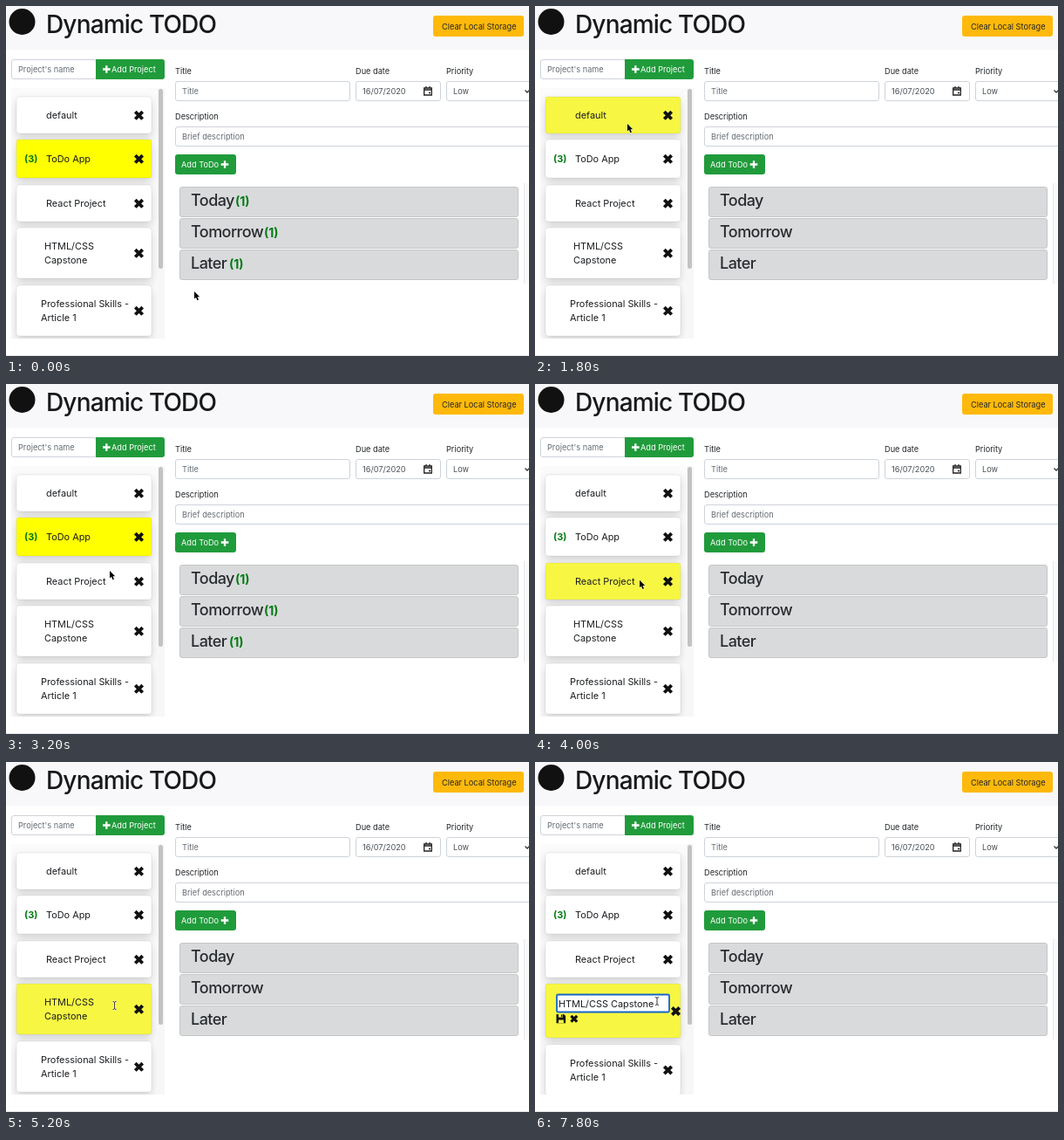
An HTML page that plays this animation: 600 by 401 pixels, repeating every 8 s.

```html
<!DOCTYPE html>
<html lang="en">
<head>
<meta charset="utf-8">
<title>Todo list</title>
<style>
  html, body { margin: 0; width: 100%; height: 100%; overflow: hidden; background: #fff; }
  svg { display: block; width: 600px; height: 401px; }
  text { font: 9.2px Inter, Roboto, sans-serif; font-optical-sizing: none; white-space: pre; fill: #212529; }
  .title { font-size: 28px; font-weight: 500; letter-spacing: -.03em; fill: #17191b; }
  .hint { fill: #656c73; }
  .value { fill: #495057; }
  .light { fill: #fff; }
  .due { font-size: 18px; font-weight: 500; letter-spacing: -.03em; fill: #282b2e; }
  .count { font-size: 14px; font-weight: 700; fill: #007b12; }
  .badge { font-size: 11px; font-weight: 700; fill: #007b12; }
  .name { font-size: 10.9px; fill: #1b1e21; }
  .card > .back { filter: drop-shadow(0 5px 5.5px rgba(0, 0, 0, .16)); }
</style>
</head>
<body>
<svg id="stage" viewBox="0 0 600 401" xmlns="http://www.w3.org/2000/svg">
  <defs><clipPath id="panel"><rect x="6" y="94" width="176" height="287"/></clipPath></defs>
</svg>
<script>
const stage = document.getElementById('stage');
const GREEN = '#209b3b', DARK = '#111', EDIT = '#f7f743';

function add(parent, tag, attrs = {}, content) {
  const el = document.createElementNS(stage.namespaceURI, tag);
  for (const key in attrs) el.setAttribute(key, attrs[key]);
  if (content) el.textContent = content;
  parent.append(el);
  return el;
}
const group = (parent, attrs) => add(parent, 'g', attrs);
const box = (parent, x, y, width, height, fill, extra) =>
  add(parent, 'rect', { x, y, width, height, fill, ...extra });
const label = (parent, x, y, str, style = '') => add(parent, 'text', { x, y, class: style }, str);
const path = (parent, d, extra) => add(parent, 'path', { d, fill: 'none', ...extra });
const line = (parent, d, stroke, width) => path(parent, d, { stroke, 'stroke-width': width });
const show = (el, on) => el.setAttribute('visibility', on ? 'visible' : 'hidden');
const cross = (parent, x, y, r = 4.2) =>
  line(parent, `M${x - r} ${y - r}l${2 * r} ${2 * r}m0 ${-2 * r}l${-2 * r} ${2 * r}`, DARK, r * .92);
const plus = (x, y, r = 4.3) =>
  line(stage, `M${x - r} ${y}h${2 * r}M${x} ${y - r}v${2 * r}`, '#fff', 2.3);

function field(x, y, w, title, value, style = 'hint') {
  box(stage, x + .5, y + .5, w - 1, 22, '#fff', { stroke: '#ced4da', rx: 2.5 });
  if (title) label(stage, x, y - 8.2, title);
  label(stage, x + 8, y + 15, value, style);
}

// Header
box(stage, 0, 0, 600, 50, '#f8f8fa');
add(stage, 'circle', { cx: 18.5, cy: 18, r: 15, fill: DARK });
label(stage, 46, 30.5, 'Dynamic TODO', 'title');
box(stage, 490, 11, 104, 24, '#ffb90b', { rx: 3 });
label(stage, 500, 26.5, 'Clear Local Storage');
box(stage, 0, 400, 600, 1, '#e4e5e6');

// New project
field(6, 61, 98, '', "Project's name");
path(stage, 'M103 61h76q3 0 3 3v17q0 3-3 3h-76z', { fill: GREEN });
plus(115.3, 72.5);
label(stage, 121, 76, 'Add Project', 'light');

// Todo form
field(194, 86, 201, 'Title', 'Title');
field(401, 86, 98, 'Due date', '16/07/2020', 'value');
field(505, 86, 110, 'Priority', 'Low', 'value');
field(194, 138, 420, 'Description', 'Brief description');
line(stage, 'M479.7 94h8.6v8h-8.6zv2h8.6M482 92v2m4 0v-2m-1 7.5h2', '#222', 1.3);
line(stage, 'M595.5 96.5l2.5 2.5l2.5-2.5', '#343a40', 1.4);
box(stage, 194, 170, 70, 23, GREEN, { rx: 3 });
label(stage, 201, 185, 'Add ToDo', 'light');
plus(251, 181.5);

// Due sections
const counts = ['Today', 'Tomorrow', 'Later'].map((name, i) => {
  const y = 207 + 36 * i;
  box(stage, 199.5, y + .5, 388, 34, '#d9dadc', { stroke: '#c4c6c8', rx: 2.5 });
  label(stage, 212, y + 22, name, 'due');
  return label(stage, [263, 296, 256][i], y + 21.5, '(1)', 'count');
});
box(stage, 594, 203, 6, 115, '#fafafa');
box(stage, 594, 203, 1, 115, '#e7e7e7');

// Project cards
const side = group(stage, { 'clip-path': 'url(#panel)' });
box(side, 6, 94, 176, 287, '#fbfbfb');
const cards = [
  [104, 42, 46, 'default'],
  [153, 44, 46, 'ToDo App'],
  [205, 42, 46, 'React Project'],
  [254, 58, 44, 'HTML/CSS', 'Capstone'],
  [320, 58, 40, 'Professional Skills -', 'Article 1']
].map(([y, h, x, ...lines]) => {
  const g = group(side, { class: 'card' });
  const back = box(g, 12, y, 155, h, '#fff',
    { class: 'back', rx: 3, stroke: 'rgba(0,0,0,.1)', 'stroke-width': .7 });
  const view = group(g);
  const mid = y + h / 2;
  lines.forEach((str, i) =>
    label(view, x, mid + 4.2 + 16.5 * (i - (lines.length - 1) / 2), str, 'name'));
  cross(view, 152.5, mid + .3);
  return { g, back, view, h };
});
label(cards[1].g, 21, 178.5, '(3)', 'badge');

// Inline editor of the fourth card
const editor = group(cards[3].g);
const input = box(editor, 25, 266.5, 129, 20, '#fff');
label(editor, 27, 280.5, 'HTML/CSS Capstone', 'name');
path(editor, 'M24.5 289h8.6l2 2v8.3h-10.6z', { fill: DARK });
line(editor, 'M27 290.7h5M27 297.2h5.8', EDIT, 3.6);
line(editor, 'M30.7 289.3v2.6', DARK, 1.5);
cross(editor, 44.8, 294.3, 3.4);
cross(editor, 161.5, 285.5);

box(side, 174, 94, 8, 287, '#f7f7f7');
box(side, 175, 95, 5, 206, '#c2c2c2', { rx: 2.5 });

// Pointers, both drawn around their own hot spot
const arrow = path(stage, 'M0 0v8.6l1.9-1.8 1.5 3.4 1.6-.7-1.5-3.2h2.7z',
  { fill: '#000', stroke: '#fff', 'stroke-width': .8, 'paint-order': 'stroke' });
const beam = group(stage);
const beamLine = 'M-2-4.5q2 0 2 1.2q0-1.2 2-1.2M0-3.5v7M-2 4.5q2 0 2-1.2q0 1.2 2 1.2';
line(beam, beamLine, '#fff', 2);
line(beam, beamLine, '#222', .9);

// Time in ticks of 200 ms, then the pointer's x and y
const TICK = 200, TICKS = 40;
const route = [
  [0, 216, 327], [2, 158, 218], [4, 106, 135], [11, 106, 135], [12, 112, 167],
  [15, 115, 180], [16, 119, 214], [17, 120, 224], [21, 120, 225], [23, 125, 279],
  [30, 124, 279], [31, 114, 277], [35, 114, 277], [39, 140, 274]
];
// Tick, then the card or mode that holds from there on
const selection = [[0, 1], [8, 0], [14, 1], [19, 2], [25, 3]];
const hovering = [[0, -1], [7, 0], [12, -1], [13, 1], [16, -1], [17, 2], [23, 3]];
const modes = [[0, 'arrow'], [23, 'beam'], [27, 'edit'], [33, 'focus']];

const at = (list, n) => list.findLast(([from]) => from <= n)[1];

function pointer(n) {
  const i = route.findLastIndex(([from]) => from <= n);
  const [t0, x0, y0] = route[i];
  const [t1, x1, y1] = route[i + 1] || [TICKS, x0, y0];
  const k = (n - t0) / (t1 - t0);
  return `translate(${x0 + (x1 - x0) * k} ${y0 + (y1 - y0) * k})`;
}

function fillFor(selected, hovered) {
  if (selected) return hovered ? EDIT : '#ff0';
  return hovered ? '#f1f1f1' : '#fff';
}

function render(n) {
  const selected = at(selection, n), hovered = at(hovering, n), mode = at(modes, n);
  const focused = mode === 'focus', editing = focused || mode === 'edit';
  cards.forEach((card, i) =>
    card.back.setAttribute('fill', fillFor(i === selected, i === hovered)));
  counts.forEach(el => show(el, selected === 1));
  show(cards[3].view, !editing);
  show(editor, editing);
  cards[3].back.setAttribute('height', cards[3].h + (editing ? 4 : 0));
  cards[4].g.setAttribute('transform', `translate(0 ${editing ? 3.7 : 0})`);
  input.setAttribute('stroke', focused ? '#1667c7' : '#444');
  input.setAttribute('stroke-width', focused ? 1.8 : 1);
  input.setAttribute('rx', focused ? 1.5 : 0);
  show(arrow, mode === 'arrow');
  show(beam, mode !== 'arrow');
  for (const el of [arrow, beam]) el.setAttribute('transform', pointer(n));
}

const start = performance.now();
let current;
function frame() {
  const n = Math.floor((performance.now() - start) / TICK) % TICKS;
  if (n !== current) render(current = n);
  requestAnimationFrame(frame);
}
frame();
</script>
</body>
</html>
```
